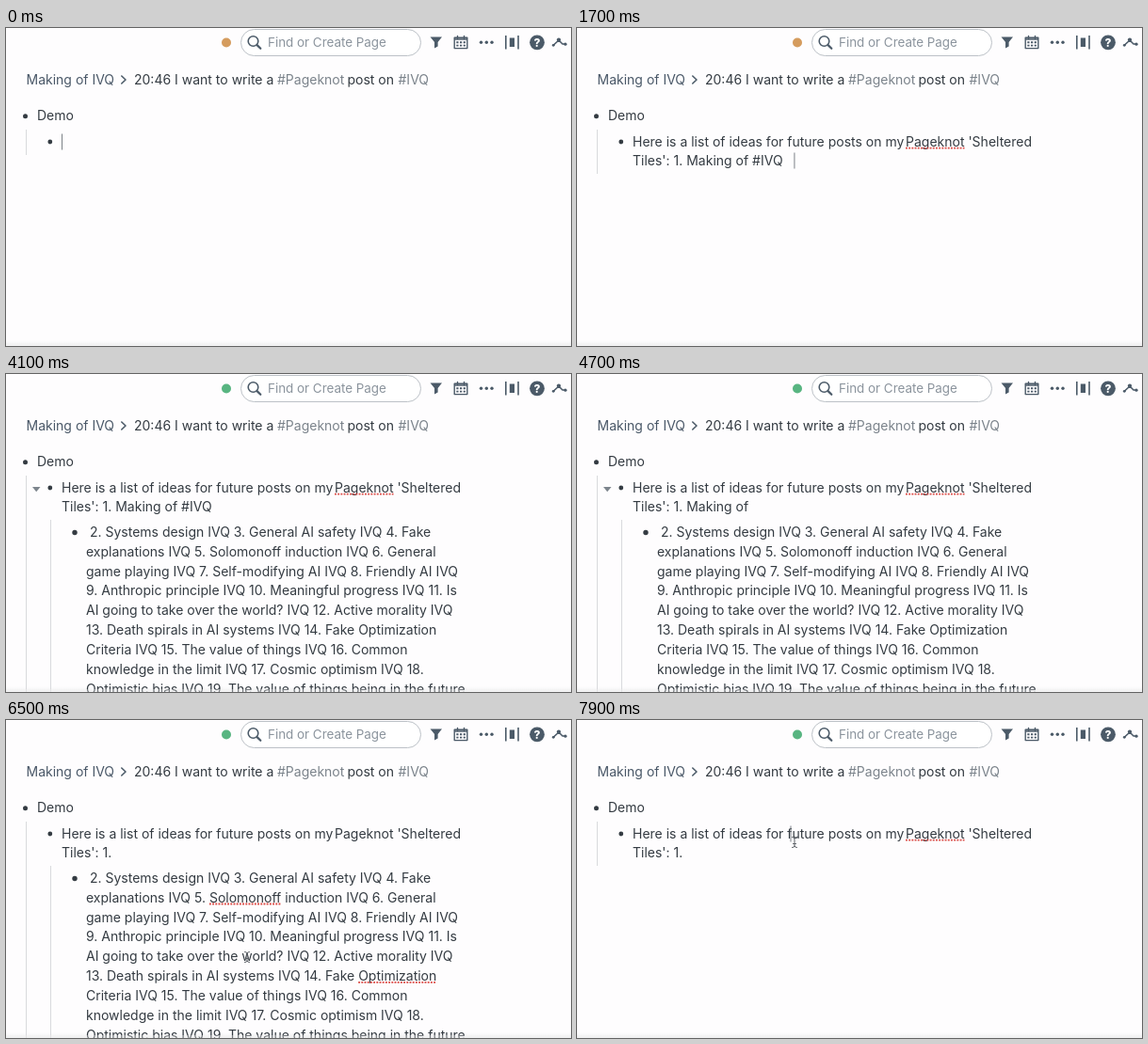
Recreate the animation shown at these times as an HTML page. Size 600 by 338 pixels, loop 8000 ms.

```html
<!DOCTYPE html>
<html lang="en">
<head>
<meta charset="utf-8">
<title>Outline demo</title>
<style>
html, body { margin: 0; width: 100%; height: 100%; overflow: hidden; background: #fefdfe; }
svg { display: block; width: 600px; height: 338px; }
text { font: 14px Inter, "Open Sans", sans-serif; fill: #343b42; white-space: pre; }
.crumb { fill: #4a5868; }
.tag { fill: #7b838b; }
.hint { font-size: 13.4px; fill: #8b949d; }
.menu { font-size: 13.7px; }
.help { font-size: 12px; font-weight: 800; fill: #fff; }
.icon { fill: #4b5a68; stroke: none; }
.line { fill: none; stroke: #4b5a68; stroke-width: 1.6; stroke-linecap: round; stroke-linejoin: round; }
.typo { stroke: #dc4a45; stroke-width: 1.9; stroke-dasharray: 1.9 1.3; }
.thread { stroke: #d9dadd; stroke-width: 1; }
</style>
</head>
<body>
<svg viewBox="0 0 600 338">
  <defs>
    <linearGradient id="fade" x2="0" y2="1">
      <stop stop-color="#fefdfe"/><stop offset="1" stop-color="#f0f0f1"/>
    </linearGradient>
    <linearGradient id="panel" x2="0" y2="1">
      <stop stop-color="#e9e8ea"/><stop offset="1" stop-color="#ededee"/>
    </linearGradient>
    <g id="clock" fill="none" stroke="#25282b" stroke-width="1.3" stroke-linecap="round">
      <circle r="5.6" fill="#fafafa"/>
      <path d="M0-3.4V0L2.4 1.6M-4 4.6L-5.6 6.6M4 4.6L5.6 6.6"/>
      <path d="M-6.2-3.6Q-6.2-6.4-3.2-6.5M6.2-3.6Q6.2-6.4 3.2-6.5" stroke-width="2"/>
    </g>
    <path id="beam" d="M-2.5-5.5Q0-5.5 0-4V4Q0 5.5 -2.5 5.5M2.5-5.5Q0-5.5 0-4M0 4Q0 5.5 2.5 5.5M-1.5 1.5H1.5"
      fill="none" stroke="#5c6167" stroke-linecap="round"/>
  </defs>
  <rect width="600" height="338" fill="#fefdfe"/>
  <rect y="332" width="600" height="6" fill="url(#fade)"/>

  <circle id="dot" cx="234" cy="15.5" r="5"/>
  <rect x="249.5" y="1.5" width="191" height="28" rx="14" fill="#fff" stroke="#bcc1c7"/>
  <path class="line" d="M266.6 18.1L270.3 21.8" style="stroke-width:2.2"/>
  <circle class="line" cx="262.5" cy="14" r="5.3"/>
  <text class="hint" x="278" y="20.4">Find or Create Page</text>
  <path class="icon" d="M450.5 9.5H463L458.6 15V19.5L455 21.5V15Z"/>
  <path class="line" d="M476.2 10.2H489.8V21.6H476.2ZM476.2 12H489.8M479.5 8.5V11M486.5 8.5V11" style="stroke-width:1.4"/>
  <path d="M478.3 15.2H488M478.3 18.6H488" stroke="#4b5a68" stroke-width="1.9" stroke-dasharray="2.2 1.5"/>
  <g class="icon"><circle cx="504.5" cy="15.3" r="1.7"/><circle cx="510.3" cy="15.3" r="1.7"/><circle cx="516" cy="15.3" r="1.7"/></g>
  <path class="icon" d="M530 8H531.6V22.5H530ZM543.2 8H544.8V22.5H543.2ZM534.8 10.5H540V20H534.8Z"/>
  <circle class="icon" cx="564" cy="15.3" r="7.9"/>
  <text class="help" x="564" y="19.7" text-anchor="middle">?</text>
  <path class="line" d="M581 18.5L587 13L591 17H594.5"/>
  <g class="icon"><circle cx="587" cy="12.6" r="2.1"/><circle cx="581.3" cy="18.3" r="1.4"/><circle cx="594" cy="17.2" r="1.6"/></g>

  <text y="60"><tspan class="crumb" x="21.5">Making of IVQ</tspan><tspan x="136">20:46 I want to write a </tspan><tspan class="tag" x="288">#Pageknot</tspan><tspan x="362.5">post on</tspan><tspan class="tag" x="416.5">#IVQ</tspan></text>
  <path class="line" d="M122.8 51L127 55L122.8 59"/>
  <circle cx="20.5" cy="93.8" r="2.5" fill="#343b42"/>
  <text x="33" y="98.4">Demo</text>
  <circle cx="46.8" cy="121" r="2.4" fill="#343b42"/>
  <g id="live"></g>
</svg>
<script>
const live = document.getElementById('live'), dot = document.getElementById('dot');
const pen = document.createElement('canvas').getContext('2d');
const TOP = 168, STEP = 20.85;
const ideas = [
  ' 2. Systems design IVQ 3. General AI safety IVQ 4. Fake',
  'explanations IVQ 5. Solomonoff induction IVQ 6. General',
  'game playing IVQ 7. Self-modifying AI IVQ 8. Friendly AI IVQ',
  '9. Anthropic principle IVQ 10. Meaningful progress IVQ 11. Is',
  'AI going to take over the world? IVQ 12. Active morality IVQ',
  '13. Death spirals in AI systems IVQ 14. Fake Optimization',
  'Criteria IVQ 15. The value of things IVQ 16. Common',
  'knowledge in the limit IVQ 17. Cosmic optimism IVQ 18.',
  'Optimistic bias IVQ 19. The value of things being in the future'
];
const menu = ['Ask #IVQ', 'Daily Routine', 'DOCX export', 'PDF export', 'today (42)', 'tomorrow (42)',
  'yesterday (42)', 'This Monday (42)', 'Last Monday (42)', 'Next Monday (42)'];

const within = (t, a, b) => t >= a && t < b;
const text = (x, y, s, cls = '') => `<text x="${x}" y="${y}" class="${cls}">${s}</text>`;
const rect = (x, y, w, h, fill) => `<rect x="${x}" y="${y}" width="${w}" height="${h}" fill="${fill}"/>`;
const typo = (x, end, y) => `<path class="typo" d="M${x} ${y}H${end}"/>`;
const thread = (x, y, end) => `<path class="thread" d="M${x} ${y}V${end}"/>`;
const caret = (x, y) => rect(x, y - 8.5, 1, 17, '#7c8187');
const beam = (x, y) => `<use href="#beam" x="${x}" y="${y}"/>`;

function width(s) {
  pen.font = '14px Inter, "Open Sans", sans-serif';
  return pen.measureText(s).width;
}

// Second line of the parent block: typed trigger, then backspaced to "1. "
function tail(t) {
  const base = "Tiles': 1. Making of #IVQ ";
  if (t < 1200) return base + ';'.repeat(t < 600 ? 0 : t < 700 ? 1 : 2);
  const s = base + '  ';
  let cut = 0;
  if (t >= 3900) cut = Math.min(3, (t - 3900) / 100 + 1);
  if (t >= 4400) cut = 3 + Math.min(4, (t - 4400) / 100 + 1);
  if (t >= 4700) cut = 7 + Math.min(10, Math.floor((t - 4700) / 120));
  return s.slice(0, s.length - cut);
}

function parentBlock(t) {
  const end = tail(t);
  let out = text(59, 125.7, 'Here is a list of ideas for future posts on my') +
    text(349, 125.7, "Pageknot 'Sheltered") + text(59, 146.2, end);
  if (!within(t, 6400, 7300)) out += typo(349, 349 + width('Pageknot'), 127.6);
  if (within(t, 3500, 6400)) out += '<path d="M28 120H36.5L32.2 125.2Z" fill="#7d858d"/>';
  const blink = t < 2700 || within(t, 3200, 3700) || within(t, 4200, 4700) || within(t, 5200, 6400) || within(t, 7300, 7700);
  if (blink) out += caret(59 + width(end), 141);
  if (t >= 7700) out += caret(226.5, 121);
  return out;
}

// Underlines one word of an idea line
function misspelt(row, word) {
  const s = ideas[row], x = 85 + width(s.slice(0, s.indexOf(word)));
  return typo(x, x + width(word), TOP + row * STEP + 6.6);
}

function childBlock(t) {
  let out = thread(47.5, 155, t < 7000 ? 338 : 182) + `<circle cx="73" cy="${TOP + .5}" r="2.7" fill="#343b42"/>`;
  if (t >= 7000) return out + caret(85, TOP);
  ideas.forEach((s, i) => {
    const y = TOP + i * STEP;
    if (t >= 6700) out += rect(85, y - 10.4, width(s) + (i < 8 ? 6 : 2), STEP + .2, '#b0cff5');
    out += text(85, y + 4.8, s);
  });
  if (t >= 6400) out += misspelt(1, 'Solomonoff') + misspelt(5, 'Optimization');
  return out;
}

function popup() {
  let out = rect(219, 59, 167, 279, 'url(#panel)') + rect(219, 59, 167, 30, '#cfcfd1');
  menu.forEach((s, i) => {
    const y = 74 + i * 29.35;
    out += i < 4 ? rect(225.5, y - 5, 11, 11, '#3565c8') : `<use href="#clock" x="231" y="${y + .5}"/>`;
    out += text(242, y + 4.9, s, 'menu');
  });
  return out;
}

function pointer(t) {
  if (within(t, 6200, 7000)) {
    const p = Math.min(1, (t - 6200) / 300);
    return beam(234 + 22 * p, 180 + 72 * p);
  }
  if (t >= 7300) {
    const p = Math.min(1, (t - 7300) / 400), e = 1 - (1 - p) ** 2;
    return beam(248 - 17 * e, 216 - 86 * e);
  }
  return '';
}

function draw(t) {
  const child = within(t, 2000, 7300);
  dot.setAttribute('fill', t < 300 || within(t, 1500, 2000) ? '#d59c5e' : t < 1500 ? '#5a7f81' : '#58b581');
  let out = thread(21.5, 108, t < 100 ? 135 : !child ? 155 : t < 7000 ? 338 : 182);
  out += t < 100 ? caret(59, 121) : parentBlock(t);
  if (child) out += childBlock(t);
  out += rect(0, 335, 600, 3, 'rgba(240,240,241,.35)');
  if (within(t, 900, 1200)) out += popup();
  live.innerHTML = out + pointer(t);
}

const start = performance.now();
let shown = -1;
function tick() {
  const t = Math.floor((performance.now() - start) % 8000 / 100) * 100;
  if (t !== shown) draw(shown = t);
  requestAnimationFrame(tick);
}
tick();
</script>
</body>
</html>
```
